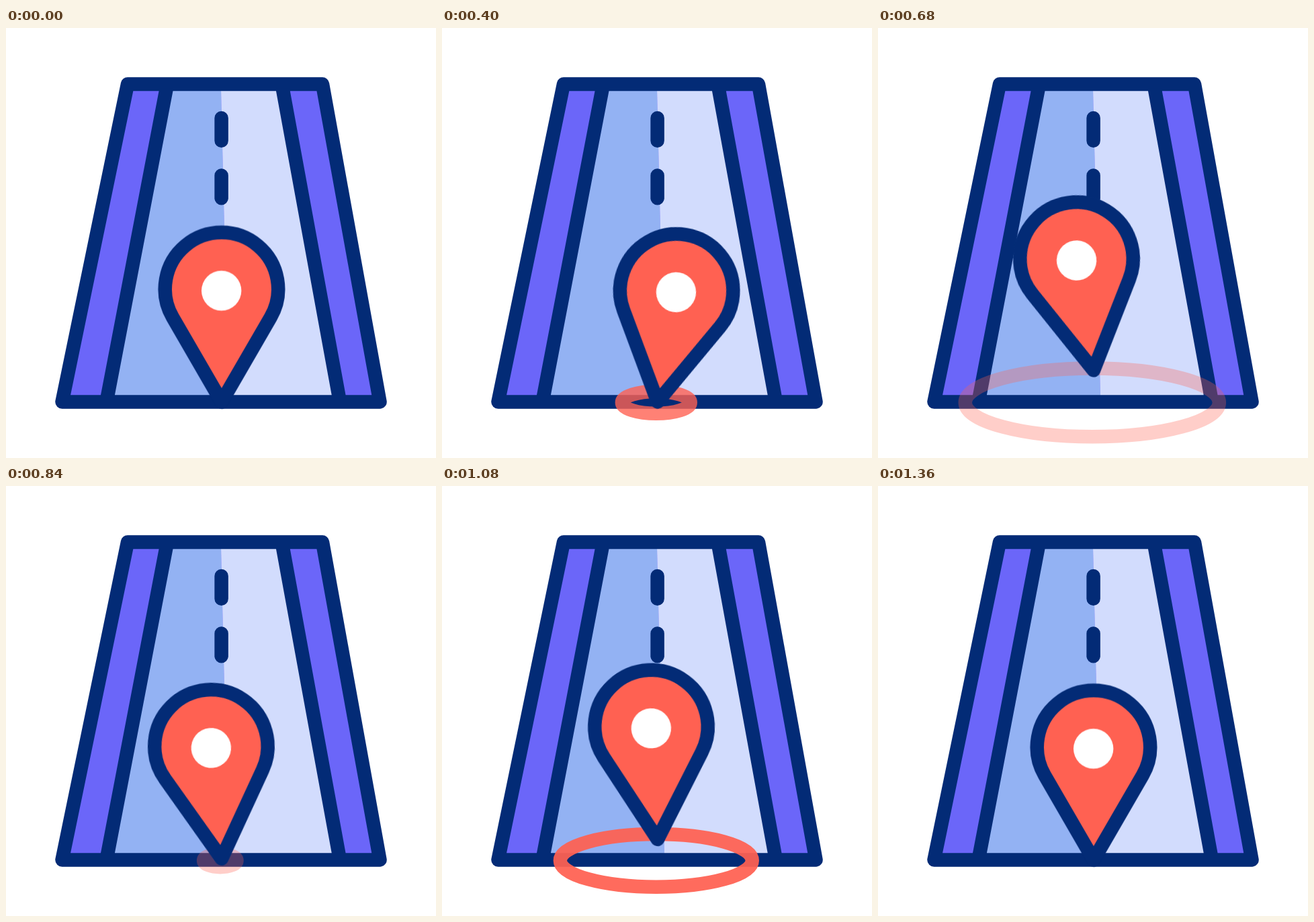
An HTML page that plays this animation: 640 px wide and 640 px high, repeating every 2 s.

```html
<!DOCTYPE html>
<html lang="en">
<head>
<meta charset="utf-8">
<title>Road pin</title>
<style>
  html, body { margin: 0; width: 100%; height: 100%; overflow: hidden; background: #fff; }
  svg { display: block; width: 100vw; height: 100vh; }
  .line { fill: none; stroke: #032b76; stroke-width: 20.5; stroke-linecap: round; stroke-linejoin: round; }
  .ring { fill: none; stroke: #ff6152; stroke-width: 20.5; opacity: 0; }
</style>
</head>
<body>
<svg viewBox="0 0 640 640">
  <path fill="#6b66f9" d="M181 83.5H471L556.5 556.5H83.5Z"/>
  <path fill="#93b2f3" d="M240 83.5H319.8L331.2 556.5H149.5Z"/>
  <path fill="#d2dcfd" d="M319.8 83.5H410.5L497 556.5H331.2Z"/>
  <path class="line" d="M181 83.5H471L556.5 556.5H83.5Z
    M240 83.5L149.5 556.5M410.5 83.5L497 556.5
    M320.6 134V167.7M320.6 219.5V253.2"/>
  <ellipse class="ring" cx="318.8" cy="557.4" rx="12.5" ry="6.7"/>
  <ellipse class="ring" cx="318.8" cy="557.4" rx="12.5" ry="6.7"/>
  <g transform="translate(320.9 556.5)">
    <g id="hop">
      <g id="tilt">
        <path class="line" style="fill:#ff6152" d="M0 0L-72.9 -125.8A84.2 84.2 0 1 1 72.9 -125.8Z"/>
        <circle cx="-.3" cy="-165.5" r="29.7" fill="#fff"/>
      </g>
    </g>
  </g>
</svg>
<script>
const LOOP = 2000, STEP = 40;
const SOFT = 'cubic-bezier(.333,0,.667,1)', FIRM = 'cubic-bezier(.5,0,.5,1)';
const anims = [];

// Each step: [time in ms, value, easing towards the next step]
function track(el, steps, style) {
  const frames = steps.map(([t, v, easing = SOFT]) => ({ offset: t / LOOP, easing, ...style(v) }));
  const anim = el.animate(frames, { duration: LOOP, iterations: Infinity });
  anim.pause();
  anims.push(anim);
}

track(document.getElementById('hop'), [
  [0, 0], [210, -50, FIRM], [340, 0], [395, 0], [730, -50, FIRM],
  [860, 0], [870, 0], [1235, -50, FIRM], [1360, 0], [LOOP, 0]
], y => ({ transform: `translate(0px, ${y}px)` }));

track(document.getElementById('tilt'), [
  [0, 0], [100, -9], [425, 10], [735, -10.4], [985, 3], [1160, -8], [1360, 0], [LOOP, 0]
], a => ({ transform: `rotate(${a}deg)` }));

document.querySelectorAll('.ring').forEach((ring, i) => {
  const start = 200 + 520 * i, end = start + 600;
  track(ring, [[0, 12.5], [start, 12.5, FIRM], [end, 201.2], [LOOP, 201.2]],
    r => ({ rx: `${r}px`, ry: `${3.6 + r / 4}px` }));
  track(ring, [[0, 0], [start, 0, FIRM], [start + 300, 1, FIRM], [end, 0], [LOOP, 0]],
    opacity => ({ opacity }));
});

const begin = performance.now();
function draw() {
  const t = Math.max(0, performance.now() - begin) % LOOP;
  const held = Math.floor(t / STEP) * STEP;
  for (const anim of anims) anim.currentTime = held;
  requestAnimationFrame(draw);
}
draw();
</script>
</body>
</html>
```
